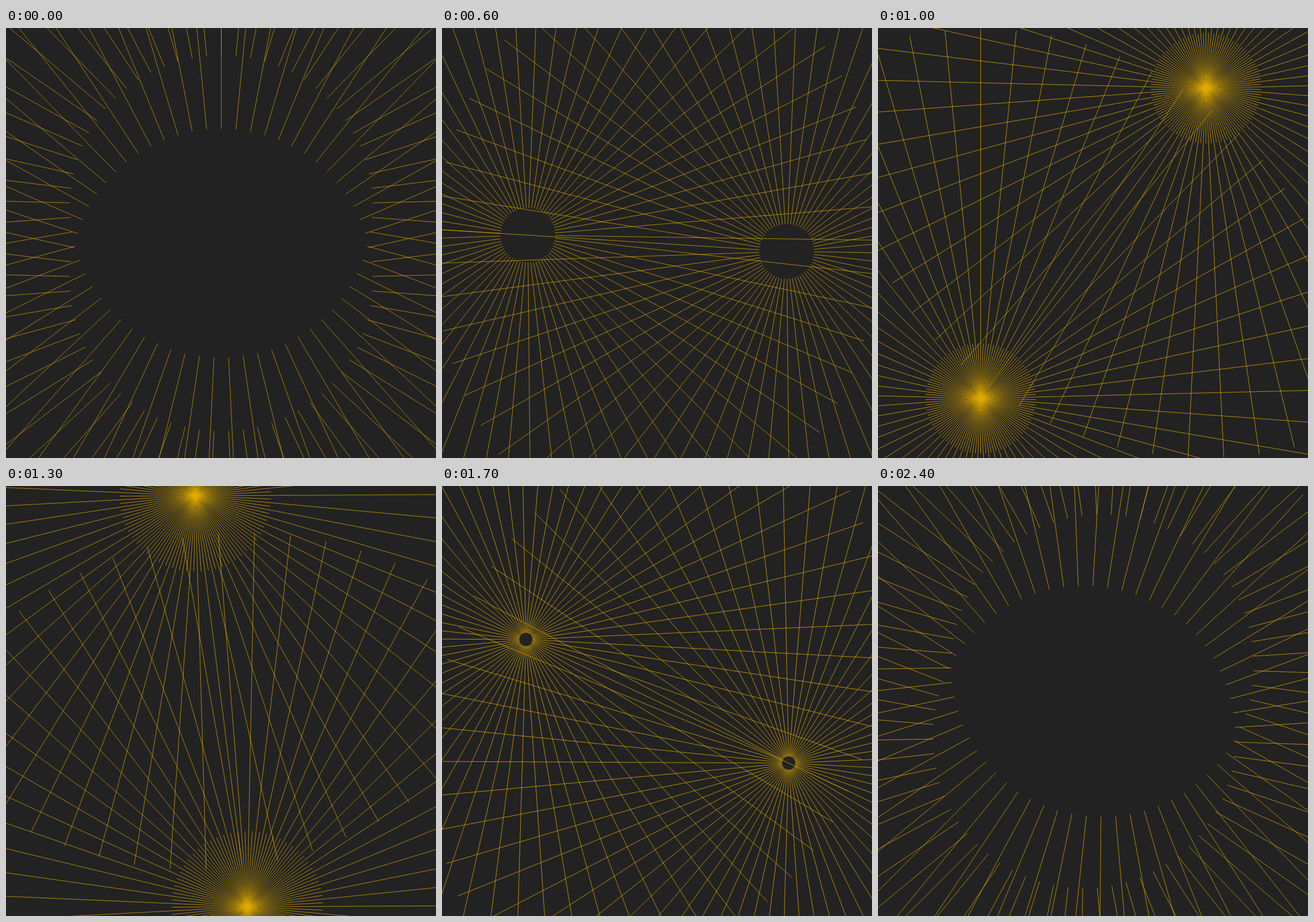
Recreate the animation shown at these times as an HTML page with a canvas. Size 748 by 748 pixels, loop 2.5 s.

```html
<!DOCTYPE html>
<html lang="en">
<head>
<meta charset="utf-8">
<title>Twin bursts</title>
<style>
  html, body { margin: 0; width: 100%; height: 100%; overflow: hidden; background: #222; }
  canvas { display: block; }
</style>
</head>
<body>
<canvas id="stage" width="748" height="748"></canvas>
<script>
const ctx = document.getElementById('stage').getContext('2d');
const SIZE = 748, CENTRE = 374.5, RAYS = 65, STEPS = 25, STEP_MS = 100;
const TAU = Math.PI * 2;

// All rays form one path, so overlaps near the hub merge into a solid disc.
function burst(y, inner, outer) {
  ctx.beginPath();
  for (let i = 0; i < RAYS; i++) {
    const angle = TAU * i / RAYS;
    const dx = Math.sin(angle), dy = -Math.cos(angle);
    ctx.moveTo(dx * inner, y + dy * inner);
    ctx.lineTo(dx * outer, y + dy * outer);
  }
  ctx.stroke();
}

function draw(step) {
  const k = 12 - Math.abs(12 - step);
  const offset = 64 + 26.94 * k;
  const inner = 263 - 35.9 * k; // below zero, rays cross their centre
  const outer = 568 + 7.5 * k;

  ctx.setTransform(1, 0, 0, 1, 0, 0);
  ctx.fillStyle = '#222';
  ctx.fillRect(0, 0, SIZE, SIZE);
  ctx.translate(CENTRE, CENTRE);
  ctx.rotate(-TAU * step / STEPS);
  ctx.lineWidth = 0.7;
  ctx.strokeStyle = '#dfab00';
  burst(-offset, inner, outer);
  burst(offset, inner, outer);
}

const start = performance.now();
function tick() {
  draw(Math.floor((performance.now() - start) / STEP_MS) % STEPS);
  requestAnimationFrame(tick);
}
tick();
</script>
</body>
</html>
```
